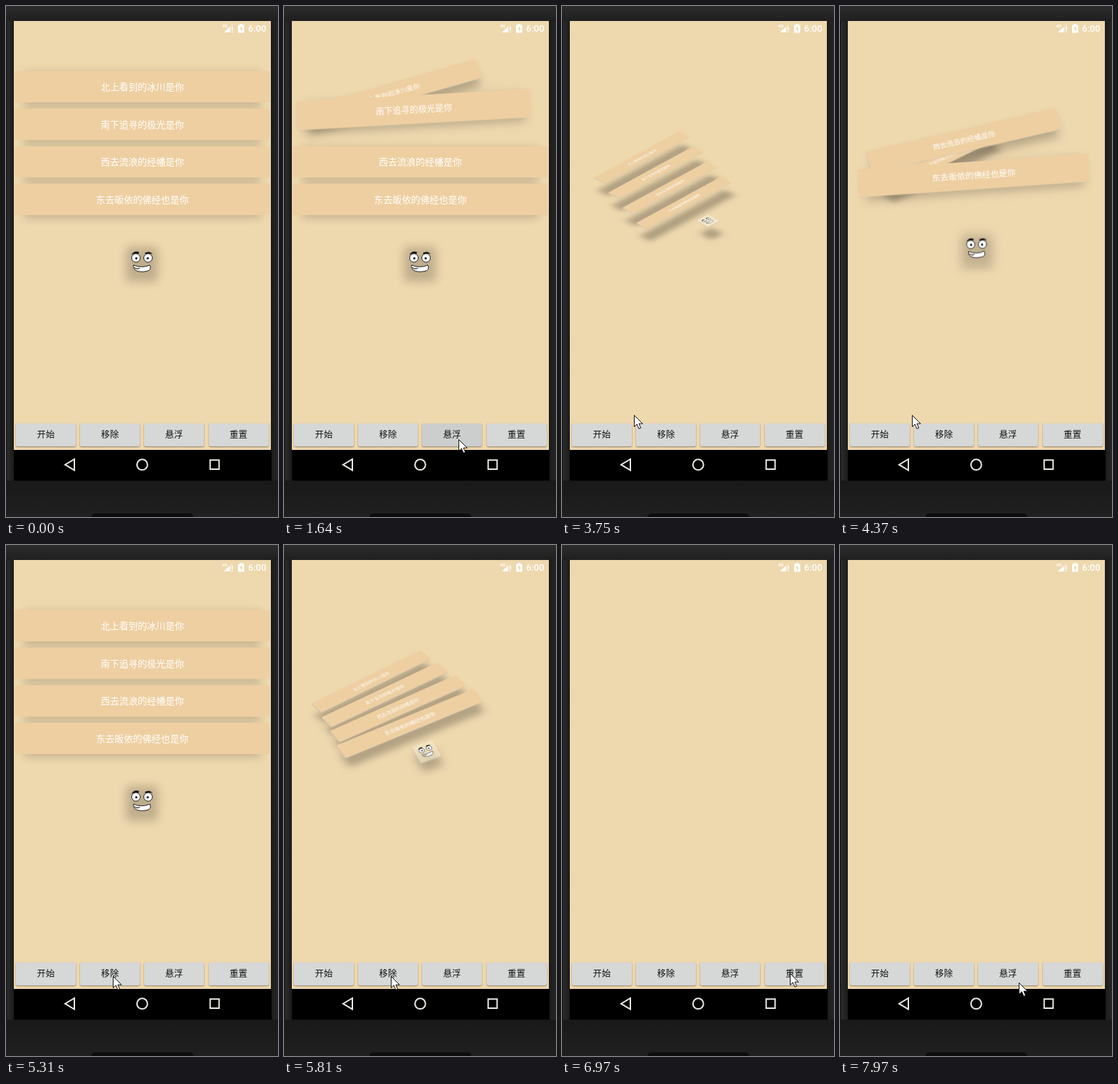
These frames come from a looping animation (382 by 716 pixels, 8 s). An HTML page:

```html
<!DOCTYPE html>
<html lang="zh-CN">
<head>
<meta charset="utf-8">
<title>悬浮卡片</title>
<style>
  html, body { margin: 0; width: 100%; height: 100%; overflow: hidden; }
  body {
    position: relative;
    background: linear-gradient(90deg, #0b0b0b 0, #2b2b2b 2px, #1b1b1b 11px, #1b1b1b 372px, #262626 100%);
    font-family: "Noto Sans CJK SC", "Noto Sans CJK", sans-serif;
  }
  body > *, .card, .shade, #world { position: absolute; }
  #top { width: 382px; height: 21px; background: linear-gradient(#2d2d2d, #1f1f1f); }
  #base { top: 665px; width: 382px; height: 51px; background: linear-gradient(#191919, #202020); }
  #slot { left: 120px; top: 711px; width: 143px; height: 12px; border-radius: 5px; background: #0d0d0d; }
  #screen { left: 11px; top: 21px; width: 361px; height: 601px; overflow: hidden; background: #eed8ae; }
  #nav { left: 11px; top: 622px; width: 362px; height: 43px; background: #000; }
  #world { left: -11px; top: -21px; }
  .card, .shade { width: 358px; height: 44px; margin: -22px -179px; border-radius: 3px; }
  .card { background: #eecfa1; color: #fff; font-size: 13px; line-height: 44px; text-align: center; }
  .shade { background: #000; }
  .face { width: 48px; height: 48px; margin: -24px; }
  .btn {
    top: 585px; width: 84px; height: 32px; border-radius: 2px; background: #d6d7d7;
    box-shadow: 0 1px 2px #0006; color: #111; font-size: 12.4px; line-height: 31px; text-align: center;
  }
  #icons { left: 0; top: 0; }
  #cursor { left: 0; top: 0; }
</style>
</head>
<body>
<div id="top"></div>
<div id="base"></div>
<div id="slot"></div>
<div id="screen"><div id="world"></div></div>
<div id="nav"></div>
<svg id="icons" width="382" height="716" fill="none" stroke="#e9e9e2" stroke-width="2">
  <path d="M96 635V650.5L83 642.7Z"/>
  <circle cx="191.3" cy="642.7" r="7.4"/>
  <path d="M286.7 636.3h12.6v12.8h-12.6z"/>
  <g fill="#fff" stroke="none">
    <path d="M306 37L314 29.500V37Z"/>
    <path d="M314 29.500L318 25.500V28H316V37H314Z" opacity=".45"/>
    <path d="M317 29h1.600v5h-1.600zM317 35.400h1.600V37h-1.600z"/>
    <text x="303.500" y="30" font-family="Roboto, sans-serif" font-size="6" font-weight="700">4G</text>
    <path fill-rule="evenodd" d="M326 26.500h2.500V25h3.500v1.500h2.500V37.500H326zM331 28l-3 4.500h2V36l3-4.500h-2z"/>
    <text x="340" y="36" font-family="Roboto, sans-serif" font-size="13" font-weight="500">6:00</text>
  </g>
</svg>
<svg id="cursor" width="16" height="23">
  <path d="M.5 .5V16.500L4.300 13L7 19.300L9.700 18.200L7 12.200H12.200Z" fill="#fff" stroke="#111"/>
</svg>
<script>
const LOOP = 8000;
const world = document.getElementById('world');
const cursor = document.getElementById('cursor');
const lines = ['北上看到的冰川是你', '南下追寻的极光是你', '西去流浪的经幡是你', '东去皈依的佛经也是你'];
const faceArt = `<svg width="48" height="48" style="display:block" fill="#fff" stroke="#222">
  <circle cx="15.500" cy="18" r="6"/><circle cx="32.500" cy="18" r="6"/>
  <path d="M12 28Q24 33 35 28Q38 35 31 36.500Q20 39 14 34.500Q11 31 12 28ZM13 31.500Q18 35 21 32"/>
  <g fill="#111" stroke="none"><circle cx="16" cy="18.500" r="1.600"/><circle cx="32" cy="18.500" r="1.600"/>
  <path d="M9 14Q13 7 20 10L19 12.500Q14 10.500 9 14ZM28 11Q35 7 39 13Q34 10.500 29 13Z"/></g></svg>`;

function add(parent, className) {
  const el = document.createElement('div');
  el.className = className;
  parent.append(el);
  return el;
}

// Resting centre, floating centre and fly-off direction of each card
const cards = lines.map((text, i) => ({
  text,
  from: [191.5, 113 + 52.7 * i],
  to: [112 + 19.7 * i, 212 + 21.2 * i],
  fly: [71 - 9.4 * i, -49 + i]
}));
cards.push({ from: [191, 359], to: [205, 301], fly: [82, -130] });

cards.forEach(c => { c.shade = add(world, c.text ? 'shade' : 'shade face'); });
cards.forEach(c => {
  c.el = add(world, c.text ? 'card' : 'card face');
  if (c.text) c.el.textContent = c.text;
  else c.el.innerHTML = faceArt;
});

const buttons = [
  { label: '开始', x: 14, press: [3000, 3400] },
  { label: '移除', x: 104, press: [5370, 5800] },
  { label: '悬浮', x: 194, press: [1330, 2100] },
  { label: '重置', x: 284.5, press: [7030, 7340] }
];
buttons.forEach(b => {
  b.el = add(document.body, 'btn');
  b.el.textContent = b.label;
  b.el.style.left = b.x + 'px';
});
document.body.append(cursor);

// time, x, y
const route = [
  [170, 152, 554], [710, 245, 607], [2120, 245, 607], [2260, 180, 602], [2800, 75, 602],
  [3400, 70, 601], [3750, 101, 573], [4610, 101, 573], [5080, 150, 604], [6110, 150, 604],
  [6340, 201, 592], [6970, 320, 600], [7450, 322, 601], [7970, 251, 613]
];

const clamp = v => Math.max(0, Math.min(1, v));
const mix = (a, b, p) => a + (b - a) * p;

// Critically damped spring, 0 to 1
function spring(ms) {
  const x = Math.max(0, ms) * 0.0085;
  return 1 - (1 + x) * Math.exp(-x);
}

function floatAmount(t, i) {
  if (t < 3800) return spring(t - 1435 - 125 * i);
  if (t < 5300) return 1 - spring(t - 3850 - 150 * (4 - i));
  return spring(t - 5390 - 40 * i);
}

function drawCard(c, i, t) {
  const p = floatAmount(t, i);
  const away = (Math.max(0, t - 6105) / 235) ** 1.5;
  const lift = 265 * p * (1 - p) ** 1.6;
  const x = mix(c.from[0], c.to[0], p) + c.fly[0] * away;
  const y = mix(c.from[1], c.to[1], p) + c.fly[1] * away - lift;
  const s = mix(1, 0.47, p);
  const turn = `rotateX(${57 * p}deg) rotateZ(${-45 * p ** 1.4}deg)`;
  c.el.style.transform = `translate(${x}px,${y}px) ${turn} scale(${s})`;
  c.el.style.boxShadow = `-2px 2px 0 rgba(203,193,178,${p})`;
  if (!c.text) c.el.style.background = `rgba(243,230,202,${p})`;
  c.shade.style.transform =
    `translate(${x + 5 * p}px,${y + mix(3, 18, p)}px) ${turn} scale(${s * mix(0.93, 1, p)},${s})`;
  c.shade.style.filter = `blur(${mix(7, 11, p)}px)`;
  c.shade.style.opacity = mix(0.2, 0.26, p);
}

function drawCursor(t) {
  cursor.style.visibility = t < route[0][0] ? 'hidden' : 'visible';
  const n = route.findIndex(k => k[0] > t);
  const b = route[n < 0 ? route.length - 1 : n];
  const a = route[n < 0 ? route.length - 1 : Math.max(0, n - 1)];
  const p = a === b ? 0 : (t - a[0]) / (b[0] - a[0]);
  cursor.style.transform = `translate(${mix(a[1], b[1], p)}px,${mix(a[2], b[2], p)}px)`;
}

function frame() {
  const t = performance.now() % LOOP;
  cards.forEach((c, i) => drawCard(c, i, t));
  buttons.forEach(({ el, press: [start, end] }) => {
    const held = Math.min(clamp((t - start) / 80), clamp((end - t) / 150));
    el.style.backgroundColor = `rgb(${[214, 215, 215].map(v => v - 10 * held)})`;
  });
  drawCursor(t);
  requestAnimationFrame(frame);
}
frame();
</script>
</body>
</html>
```
